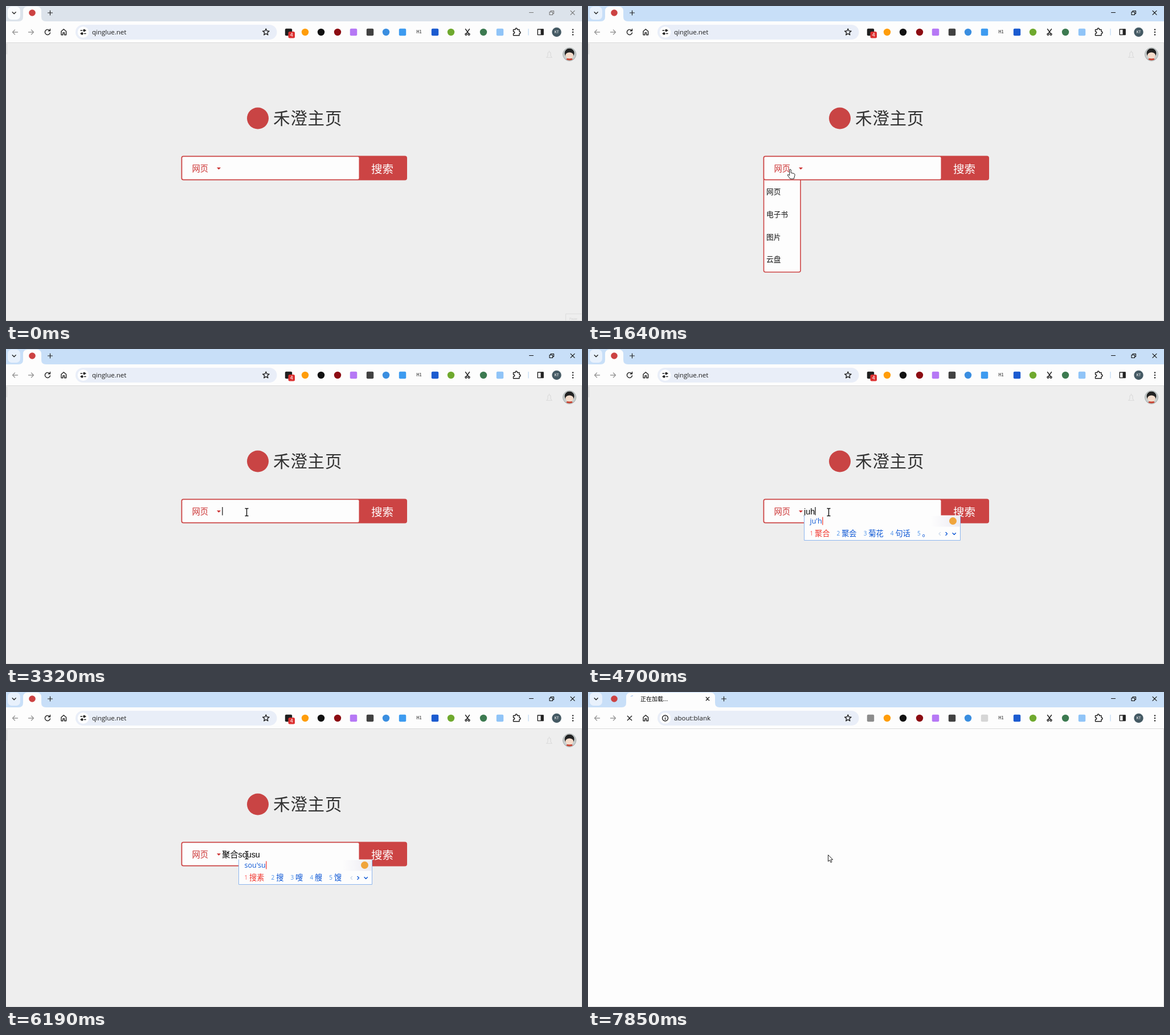
An HTML page for the animation above (8 s loop, 1011 px wide and 554 px high).

```html
<!DOCTYPE html>
<html lang="zh-CN">
<head>
<meta charset="utf-8">
<style>
html, body { margin: 0; width: 100%; height: 100%; overflow: hidden; background: #eee; }
svg { display: block; }
text { font-family: "Noto Sans CJK SC", "Noto Sans CJK", sans-serif; white-space: pre; }
.latin { font-family: "Open Sans", "Noto Sans CJK SC", "Noto Sans CJK", sans-serif; }
.typed { font-family: "Liberation Sans", "Noto Sans CJK SC", "Noto Sans CJK", sans-serif; }
.line { fill: none; stroke: #222; stroke-width: 1.4; stroke-linecap: round; stroke-linejoin: round; }
.cursor { fill: #fff; stroke: #222; stroke-width: 1; stroke-linejoin: round; }
</style>
</head>
<body>
<svg width="1011" height="554" viewBox="0 0 1011 554">
  <defs>
    <clipPath id="menuClip"><rect id="menuClipBox" x="307" y="304" width="68" height="0"/></clipPath>
    <clipPath id="face"><circle cx="989" cy="85" r="10.5"/></clipPath>
    <linearGradient id="haze"><stop stop-color="#fdfdfd"/><stop offset="1" stop-color="#ecebf3"/></linearGradient>
  </defs>

  <rect id="pageBg" y="64" width="1011" height="490" fill="#eee"/>
  <g id="page">
    <rect y="66" width="2.5" height="19" fill="#e0e0e0"/>
    <g id="corner">
      <path d="M982.500 554V541.500H1011" fill="none" stroke="#ddd"/>
      <text x="989" y="552" font-size="5" fill="#ccc">Pause</text>
    </g>
    <g id="user">
      <path d="M949 90.500h9l-2-3v-4a2.500 2.500 0 0 0-5 0v4zM953.500 80.500v-2" fill="none" stroke="#dcdcdc" stroke-width="1.200"/>
      <circle cx="989" cy="85" r="11.500" fill="#c9cfcf" stroke="#a5abab"/>
      <g clip-path="url(#face)">
        <ellipse cx="989" cy="96" rx="7" ry="4.500" fill="#c8402f"/>
        <circle cx="989" cy="83" r="8.500" fill="#222"/>
        <ellipse cx="989" cy="87" rx="7" ry="5.500" fill="#f4dccb"/>
      </g>
    </g>
    <g id="main">
      <circle cx="442" cy="197.500" r="19" fill="#c94444"/>
      <text x="469" y="207.500" font-size="29.500" font-weight="500" letter-spacing=".8" fill="#333">禾澄主页</text>
      <g id="menu" clip-path="url(#menuClip)">
        <rect id="menuBox" x="308.500" y="300" width="64.500" rx="3" fill="#fdfdfd" stroke="#c44" stroke-width="1.600"/>
        <rect id="hover" x="309.500" width="62.700" height="39.700" fill="#efefef"/>
        <g id="items" font-size="12.700"></g>
      </g>
      <rect x="307.500" y="263.500" width="396.500" height="43" rx="4" fill="#c44"/>
      <rect x="309.300" y="265.200" width="310.200" height="39.600" rx="2" fill="#fdfdfd"/>
      <text x="326.500" y="291" font-size="14.300" fill="#c33">网页</text>
      <path d="M370 284h7l-3.500 3.800z" fill="#c33"/>
      <text x="641" y="293.500" font-size="19.500" fill="#fff">搜索</text>
      <text id="typed" class="typed" x="379" y="290.500" font-size="14.300"/>
      <rect id="caret" y="278" width="1.200" height="14.500" fill="#111"/>
    </g>
    <g id="scrollbar">
      <rect x="1000" y="65" width="11" height="489" fill="#f0f0f0"/>
      <rect x="1001" y="78" width="9" height="383" fill="#bfc4c4"/>
      <path d="M1002.500 73.500h6l-3-3.500z" fill="#999"/>
    </g>
    <path id="bubble" d="M0 548h52q4 0 4 6H0z" fill="#c8dff8"/>
    <g id="ime"></g>
  </g>

  <rect id="titleBar" width="1011" height="28"/>
  <rect id="chevronBg" x="3" y="1" width="22" height="23" rx="7"/>
  <path class="line" d="M11.200 10.700l3 3 3-3"/>
  <path id="tab" fill="#fdfdfd"/>
  <circle cx="46" cy="12" r="5.800" fill="#cc4242"/>
  <path id="plus" class="line" style="stroke-width:1.200" d="M-4 12h8M0 8v8"/>
  <g id="newTab">
    <path d="M75 8q1.500-1.500 4-1.500" fill="none" stroke="#a9c8f0" stroke-width="1.300"/>
    <text x="92" y="16" font-size="10">正在加载...</text>
    <path class="line" d="M207.300 9.300l5.400 5.400m0-5.400l-5.400 5.400"/>
  </g>
  <path id="windowButtons" class="line" style="stroke-width:1.100" d="M918.500 11.500h7M954 10.500h5.500v5H954zM956 10V8.500h5.500v5H960M991 8.300l7 7m0-7l-7 7"/>

  <rect y="27" width="1011" height="38" fill="#fdfdfd"/>
  <path d="M0 64.500h1011" stroke="#dadada"/>
  <path class="line" style="stroke:#999" d="M20.500 46h-9m4-4l-4 4 4 4M39.500 46h9m-4-4l4 4-4 4"/>
  <path id="reload" class="line" d="M76.500 43a4.600 4.600 0 1 0 1 4M77.500 40.500v3.300h-3.300"/>
  <path id="stop" class="line" d="M69.300 42.300l7.400 7.400m0-7.400l-7.400 7.400"/>
  <path class="line" d="M97 44.500l4.300-3.700 4.300 3.700v6.200h-3v-3.700h-2.600v3.700h-3z"/>
  <rect x="122" y="33" width="353.500" height="26" rx="13" fill="#e9eef8"/>
  <circle cx="135.500" cy="46" r="9.800" fill="#fff"/>
  <path id="tune" class="line" d="M131 43h2.500M137.500 43h2.500M131 48.500h2.500M137.500 48.500h2.500M135.800 43a1.500 1.500 0 1 0 3 0a1.500 1.500 0 1 0-3 0M132 48.500a1.500 1.500 0 1 0 3 0a1.500 1.500 0 1 0-3 0"/>
  <path id="info" class="line" d="M130.500 46a5 5 0 1 0 10 0a5 5 0 1 0-10 0M135.500 45.700v2.800M135.500 43.400v.1"/>
  <text id="url" class="latin" x="151" y="50" font-size="11.500" fill="#1c1c1c"/>
  <path id="star" class="line"/>

  <g id="extensions"></g>
  <g id="badge">
    <rect x="495.500" y="45" width="11.500" height="11.500" rx="2.500" fill="#dd3232"/>
    <text x="501.300" y="54.300" font-size="9" text-anchor="middle" fill="#fff">4</text>
  </g>
  <text x="725" y="48.300" font-size="7" font-weight="700" text-anchor="middle" fill="#555">H1</text>
  <path class="line" d="M806.500 40.500l5.500 8M813.500 40.500l-5.500 8M806 49.800a1.500 1.500 0 1 0 3 0a1.500 1.500 0 1 0-3 0M811 49.800a1.500 1.500 0 1 0 3 0a1.500 1.500 0 1 0-3 0"/>
  <path class="line" d="M890.500 41.500h3.500q0-2.500 1.700-2.500t1.700 2.500h3.600v3.500q2 0 2 1.700t-2 1.700v3.300h-10.500v-3.300q2.200 0 2.200-1.700t-2.200-1.700z"/>
  <path d="M917 40v11.500" stroke="#c9def5" stroke-width="1.500"/>
  <path class="line" d="M933.200 41h9.800v9.600h-9.800z"/><path d="M938.500 40.500h5v10.500h-5z" fill="#222"/>
  <circle cx="966.500" cy="46" r="8.200" fill="#455a64"/>
  <text x="966.500" y="48.300" font-size="6.500" text-anchor="middle" fill="#fff">KT</text>
  <g fill="#222"><circle cx="995" cy="41.500" r="1.200"/><circle cx="995" cy="46" r="1.200"/><circle cx="995" cy="50.500" r="1.200"/></g>
  <path d="M1010.500 65V553.500H0" fill="none" stroke="#dcdcdc"/>
  <g id="pointer">
    <path id="hand" class="cursor" d="M-1.300 1q1.300-2 2.600 0v5.500l5 1q2.200.8 1.800 3l-1 3.500-.8 3H0l-4.500-6q-.5-2 1.500-1.500l1.700 1.700z"/>
    <path id="arrow" class="cursor" d="M0 0v11.500l2.700-2.400 1.900 4.200 1.900-.9-1.900-4h3.700z"/>
    <g id="beam" fill="none">
      <path d="M-3-6.500h2.200l.8.800.8-.8H3M0-5.700v11.500M-3 6.500h2.200l.8-.8.800.8H3" stroke="#fff" stroke-width="2.400"/>
      <path d="M-3-6.500h2.200l.8.800.8-.8H3M0-5.700v11.500M-3 6.500h2.200l.8-.8.800.8H3" stroke="#111" stroke-width="1.400"/>
    </g>
  </g>
</svg>
<script>
const LOOP = 8000, ROW = 39.75, MENU_TOP = 306.5, FULL = 290;
const $ = id => document.getElementById(id);
const show = (id, on) => { $(id).style.display = on ? '' : 'none'; };
const set = (id, attrs) => { for (const k in attrs) $(id).setAttribute(k, attrs[k]); };

// Each step lists only what changes from the one before it.
const steps = [
  { t: 0, active: false, corner: true, cursor: null, menu: 0, hover: -1, scroll: false,
    text: '', caret: false, ime: null, loading: false },
  { t: 330, corner: false, cursor: ['arrow', 900, 505] },
  { t: 470, cursor: ['arrow', 700, 440] },
  { t: 610, cursor: ['arrow', 480, 375] },
  { t: 750, cursor: ['arrow', 330, 325] },
  { t: 890, cursor: ['arrow', 267, 295] },
  { t: 1030, cursor: ['arrow', 300, 283] },
  { t: 1170, cursor: ['hand', 337, 285] },
  { t: 1310, cursor: ['hand', 355, 287] },
  { t: 1640, active: true, menu: 162 },
  { t: 1800, menu: FULL, scroll: true },
  { t: 1960, cursor: ['hand', 350, 318], hover: 0 },
  { t: 2120, cursor: ['hand', 346, 352], hover: 1 },
  { t: 2280, cursor: ['hand', 350, 362], hover: 1 },
  { t: 2640, cursor: ['hand', 366, 304.5], hover: 0 },
  { t: 2800, cursor: ['beam', 395, 296], hover: -1 },
  { t: 2960, cursor: ['beam', 422.5, 287] },
  { t: 3120, menu: 150, scroll: false, caret: true },
  { t: 3320, menu: 0 },
  { t: 4240, text: 'ju', ime: [379.5, 292.5, 'ju', '据 局 巨 句 剧'] },
  { t: 4700, text: 'juh', ime: [379.5, 292.5, "ju'h", '聚合 聚会 菊花 句话 。'] },
  { t: 5220, text: '聚合', ime: null },
  { t: 5550, text: '聚合so', caret: false, ime: [408.5, 294.5, 'so', '所 搜 锁 索 嗖'] },
  { t: 5940, text: '聚合sou', ime: [408.5, 294.5, 'sou', '搜 嗖 艘 馊 叟'] },
  { t: 6190, text: '聚合sousu', ime: [408.5, 294.5, "sou'su", '搜素 搜 嗖 艘 馊'] },
  { t: 6780, text: '聚合sousuo', ime: [408.5, 294.5, "sou'suo", '搜索 搜所 搜 嗖 艘'] },
  { t: 7300, text: '聚合搜索', caret: true, ime: null },
  { t: 7850, loading: true, cursor: ['arrow', 421.5, 286.5] }
];
const states = [];
steps.forEach((step, i) => states.push({ ...states[i - 1], ...step }));

const tabPath = (l, r) =>
  `M${l - 8} 27q8 0 8-8V9q0-8 8-8H${r - 8}q8 0 8 8v10q0 8 8 8z`;

function buildStatic() {
  $('items').innerHTML = ['网页', '电子书', '图片', '云盘', '小说', '知识', '音乐']
    .map((s, i) => `<text x="313" y="${331.2 + i * ROW}">${s}</text>`).join('');

  const star = Array.from({ length: 10 }, (_, i) => {
    const r = i % 2 ? 2.7 : 6, a = i * Math.PI / 5;
    return `${(456.3 + r * Math.sin(a)).toFixed(1)} ${(46 - r * Math.cos(a)).toFixed(1)}`;
  });
  set('star', { d: `M${star.join('L')}z` });

  const icons = [['s', 496, '#202020'], ['c', 525, '#ff9d0a'], ['c', 553, '#111'], ['c', 582, '#8c0b12'],
    ['s', 610, '#b678f5'], ['s', 639, '#414141'], ['c', 667, '#3a8ee0'], ['s', 696, '#3d9bf0'],
    ['s', 753, '#1b5bd0'], ['c', 781, '#6fa92e'], ['c', 838, '#3c7a50'], ['s', 867, '#90c4f7']];
  $('extensions').innerHTML = icons.map(([kind, x, fill]) => kind === 'c'
    ? `<circle cx="${x}" cy="46" r="6.2" fill="${fill}"/>`
    : `<rect id="ext${x}" x="${x - 6.2}" y="39.800" width="12.400" height="12.400" rx="2" fill="${fill}"/>`).join('');
}

function drawIme(ime) {
  show('ime', ime);
  if (!ime) return;
  const [x, y, keys, list] = ime;
  let cx = x + 10, row = '';
  list.split(' ').forEach((word, i) => {
    const [num, ink] = i ? ['#4a90e8', '#0a55d4'] : ['#f66', '#f0342c'];
    row += `<text class="latin" x="${cx}" y="${y + 35}" font-size="10" fill="${num}">${i + 1}</text>
      <text x="${cx + 8.6}" y="${y + 36}" font-size="13.200" fill="${ink}">${word}</text>`;
    cx += 20.7 + 13.2 * word.length;
  });
  const w = Math.round(cx - x + 41.5), h = 44, right = x + w;
  const arrow = (dx, d, color) =>
    `<path class="line" style="stroke:${color}" d="M${right + dx} ${y + 32.5}${d}"/>`;
  $('ime').innerHTML = `<rect x="${x}" y="${y}" width="${w}" height="${h}" fill="#fdfdfd"/>
    <path d="M${x} ${y}v${h}h${w}v-${h}" fill="none" stroke="#8db6ee"/>
    <rect x="${right - 52}" y="${y + 1}" width="51" height="19" fill="url(#haze)"/>
    <text id="keys" class="latin" x="${x + 10}" y="${y + 14.5}" font-size="12.500" fill="#0a55d4">${keys}</text>
    <rect id="keyCaret" y="${y + 3}" width="1.200" height="14" fill="#f0342c"/>${row}
    <circle cx="${right - 13}" cy="${y + 10}" r="6.500" fill="#f0a53c"/>` +
    arrow(-35, 'm0-2.5l-2.500 2.500 2.500 2.500', '#cbd8ea') +
    arrow(-25.5, 'm0-2.500l2.500 2.500-2.500 2.500', '#0a55d4') +
    arrow(-13.5, 'm0-1.200l2.700 2.600 2.700-2.600', '#0a55d4');
  set('keyCaret', { x: x + 10.5 + $('keys').getComputedTextLength() });
}

function render(s) {
  const { loading } = s;
  show('page', !loading);
  set('pageBg', { fill: loading ? '#fdfdfd' : '#eee' });
  set('titleBar', { fill: s.active ? '#c8dff8' : '#dce3eb' });
  set('chevronBg', { fill: s.active ? '#e8f1fc' : '#fafcfe' });
  $('windowButtons').style.stroke = s.active ? '#111' : '#777';
  show('corner', s.corner);

  set('tab', { d: loading ? tabPath(67, 223) : tabPath(30, 62) });
  set('plus', { transform: `translate(${loading ? 238.5 : 77.5} 0)` });
  for (const id of ['newTab', 'stop', 'info']) show(id, loading);
  for (const id of ['reload', 'tune', 'badge']) show(id, !loading);
  $('url').textContent = loading ? 'about:blank' : 'qinglue.net';
  set('ext496', { fill: loading ? '#8c8c8c' : '#202020' });
  set('ext696', { fill: loading ? '#d6d6d6' : '#3d9bf0' });

  set('main', { transform: `translate(${s.scroll ? -6.5 : 0} 0)` });
  set('user', { transform: `translate(${s.scroll ? -13 : 0} 0)` });
  show('scrollbar', s.scroll);
  show('bubble', s.hover >= 0);

  show('menu', s.menu);
  set('menuClipBox', { height: s.menu + 3 });
  set('menuBox', { height: s.menu + 6 });
  show('hover', s.hover >= 0);
  set('hover', { y: MENU_TOP + Math.max(s.hover, 0) * ROW });
  [...$('items').children].forEach((el, i) => el.setAttribute('fill', i === s.hover ? '#c33' : '#111'));

  $('typed').textContent = s.text;
  show('caret', s.caret);
  set('caret', { x: 379.3 + $('typed').getComputedTextLength() });
  drawIme(s.ime);

  show('pointer', s.cursor);
  if (s.cursor) {
    const [kind, x, y] = s.cursor;
    for (const id of ['hand', 'arrow', 'beam']) show(id, id === kind);
    set('pointer', { transform: `translate(${x} ${y})` });
  }
}

let shown = -1;
const start = performance.now();
function tick() {
  const t = (performance.now() - start) % LOOP;
  const i = states.findLastIndex(s => s.t <= t);
  if (i !== shown) render(states[shown = i]);
  requestAnimationFrame(tick);
}
buildStatic();
tick();
</script>
</body>
</html>
```
